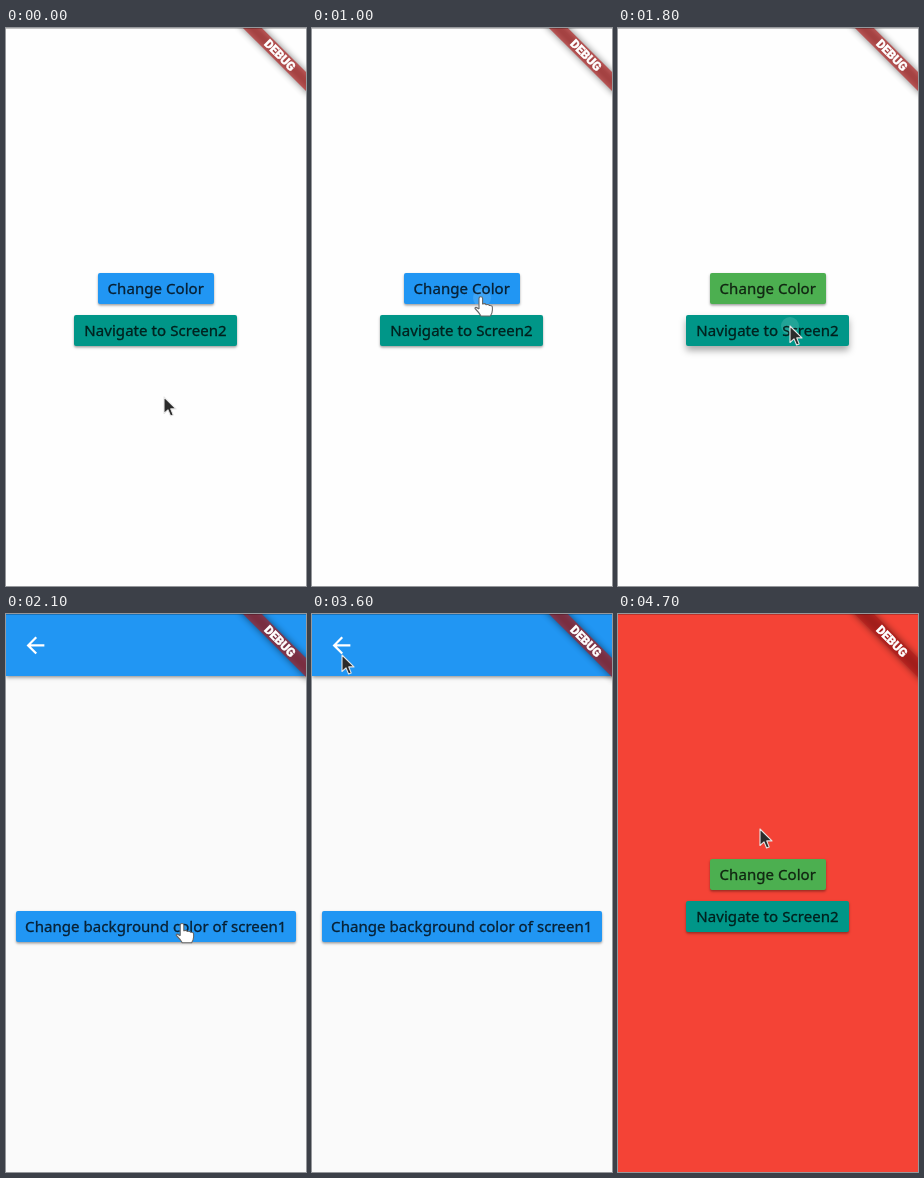
An HTML page for the animation above (4900 ms loop, 300 by 558 pixels).

```html
<!DOCTYPE html>
<html lang="en">
<head>
<meta charset="utf-8">
<title>Change Color</title>
<style>
  html, body { margin: 0; width: 100%; height: 100%; overflow: hidden; }
  #stage { position: relative; width: 300px; height: 558px; overflow: hidden; }
  .page { position: absolute; inset: 0; overflow: hidden; }
  #second { background: #fafafa; }
  .bar {
    position: absolute; left: 0; top: 0; width: 300px; height: 62px;
    background: #2196f3; box-shadow: 0 1px 4px rgba(0, 0, 0, .5);
  }
  .button {
    position: absolute; height: 31px; border-radius: 2px; overflow: hidden;
    font: 500 15px/31px "Noto Sans", "Open Sans", sans-serif;
    letter-spacing: .06px; -webkit-text-stroke: .3px;
    color: rgba(0, 0, 0, .75); text-align: center; white-space: nowrap;
  }
  .button span { position: relative; }
  .ripple { position: absolute; border-radius: 50%; background: #fff; }
  #change { left: 92px; top: 244.5px; width: 115.5px; }
  #navigate { left: 68px; top: 286.5px; width: 163px; background: #009688; }
  #recolor { left: 10px; top: 296.5px; width: 279.5px; background: #2196f3; }
  #back { position: absolute; left: 14px; top: 16px; width: 32px; height: 32px; }
  svg { position: absolute; left: 0; top: 0; }
</style>
</head>
<body>
<div id="stage">
  <div class="page" id="first">
    <div class="button" id="change"><i class="ripple"></i><span>Change Color</span></div>
    <div class="button" id="navigate"><i class="ripple"></i><span>Navigate to Screen2</span></div>
  </div>
  <div class="page" id="second">
    <div class="bar"></div>
    <div id="back">
      <svg width="32" height="32">
        <path transform="translate(2.1 2.1) scale(1.113)" fill="#fff"
          d="M20 11H7.83l5.59-5.59L12 4l-8 8 8 8 1.41-1.41L7.83 13H20z"/>
      </svg>
    </div>
    <div class="button" id="recolor"><i class="ripple"></i><span>Change background color of screen1</span></div>
  </div>
  <svg width="300" height="558">
    <defs>
      <filter id="soft" x="-20%" y="-150%" width="140%" height="400%"><feGaussianBlur stdDeviation="3.6"/></filter>
    </defs>
    <g transform="translate(300 0) rotate(45)">
      <rect x="-50" y="31.2" width="100" height="13.4" opacity=".5" filter="url(#soft)"/>
      <rect x="-50" y="31.2" width="100" height="13.4" fill="#b71c1c" opacity=".63"/>
      <text x=".8" y="41.8" text-anchor="middle" fill="#fff" stroke="#fff" stroke-width=".5"
        font-family="Roboto, sans-serif" font-weight="900" font-size="12">DEBUG</text>
    </g>
    <rect width="300" height="1" opacity=".24"/>
    <g id="cursor">
      <path id="arrow" fill="#2b2b2b" stroke="#e6e6e6" stroke-width="1.1" stroke-linejoin="round"
        d="M0 0V16.5L4 12.9L6.6 19L9.2 17.9L6.7 11.9H12Z"/>
      <path id="hand" transform="translate(-1 -1)" fill="#fff" stroke="#666" stroke-width="1.1" stroke-linejoin="round"
        d="M-2 12V1.5a1.8 1.8 0 0 1 3.6 0V7q2.5-1 3.5.7q2.5-.8 3.3.8q3-.3 3 2V13q0 3-2 6H0q-2-3.5-6-7.5q0-2.5 4 .5"/>
    </g>
  </svg>
</div>
<script>
const LOOP = 4900, STEP = 100;
const PUSH = 1800, POP = 3600, TRANSITION = 300;
const $ = id => document.getElementById(id);

const start = { x: 158, y: 369 };
const moves = [
  { from: 100, to: 700, x: 170, y: 270 },
  { from: 1200, to: 1600, x: 172, y: 298 },
  { from: PUSH, to: 2400, x: 181, y: 320 },
  { from: 2800, to: 3300, x: 30, y: 41 },
  { from: POP, to: 4200, x: 142, y: 215 }
];
const presses = [
  { id: "change", down: 1000, up: 1200 },
  { id: "navigate", down: 1700, up: 2000 },
  { id: "recolor", down: 2500, up: 2900 }
];

const clamp = v => Math.min(1, Math.max(0, v));
const within = (t, a, b) => t >= a && t < b;
const easeOut = (u, power) => 1 - (1 - clamp(u)) ** power;
const settle = (t, begin) => easeOut((t - begin) / TRANSITION, 2);

function pointerAt(t) {
  return moves.reduce((p, m) => {
    const k = easeOut((t - m.from) / (m.to - m.from), 1.25);
    return { x: p.x + (m.x - p.x) * k, y: p.y + (m.y - p.y) * k };
  }, start);
}

function hovers(id, p) {
  const { offsetLeft: x, offsetTop: y, offsetWidth: w, offsetHeight: h } = $(id);
  return within(p.x, x, x + w) && within(p.y, y, y + h);
}

function drawPress({ id, down, up }, t) {
  const button = $(id), ripple = button.firstElementChild;
  const lift = Math.min(clamp((t - down) / 100), clamp((up + 100 - t) / 200));
  button.style.boxShadow =
    `0 ${1.5 + 3 * lift}px ${2.5 + 4.5 * lift}px rgba(0,0,0,${.38 - .04 * lift})`;
  const p = pointerAt(down), r = 9 + Math.max(0, t - down - 100) / 25;
  Object.assign(ripple.style, {
    left: p.x - button.offsetLeft - r + "px",
    top: p.y - button.offsetTop - r + "px",
    width: 2 * r + "px",
    height: 2 * r + "px",
    opacity: within(t, down, up) ? .13 : 0
  });
}

function draw(t) {
  const popped = t > POP, onSecond = t > PUSH && !popped;
  $("first").style.background = popped ? "#f44336" : "#fefefe";
  $("first").style.transform = popped ? `scale(${1.05 - .05 * settle(t, POP)})` : "none";
  $("change").style.background = t < 1200 ? "#2196f3" : "#4caf50";
  $("second").style.display = onSecond ? "block" : "none";
  $("second").style.transform = `scale(${.9 + .1 * settle(t, PUSH)})`;
  presses.forEach(p => drawPress(p, t));

  // The pointer cannot hover while a page is changing.
  const p = pointerAt(t);
  const changing = [PUSH, POP].some(s => within(t, s, s + TRANSITION));
  const targets = onSecond ? ["back", "recolor"] : ["change", "navigate"];
  const isHand = !changing && targets.some(id => hovers(id, p));
  $("hand").style.display = isHand ? "inline" : "none";
  $("arrow").style.display = isHand ? "none" : "inline";
  $("cursor").setAttribute("transform", `translate(${p.x} ${p.y})`);
}

const begin = performance.now();
function tick() {
  const t = (performance.now() - begin) % LOOP;
  draw(Math.floor(t / STEP) * STEP);
  requestAnimationFrame(tick);
}
tick();
</script>
</body>
</html>
```
